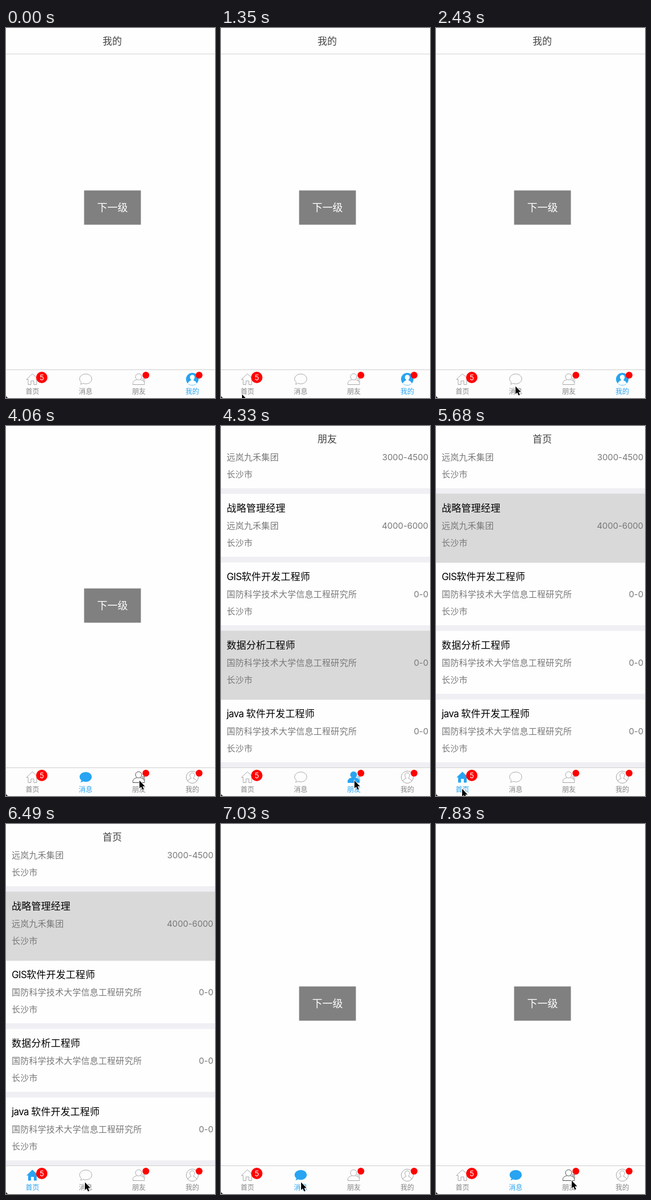
Animation of 368x648 px, one loop 8000 ms. Source, as an HTML page:

```html
<!DOCTYPE html>
<html lang="zh-CN">
<head>
<meta charset="utf-8">
<title>Tab bar</title>
<style>
html, body { margin: 0; width: 100%; height: 100%; overflow: hidden; background: #fefefe; }
svg { display: block; width: 368px; height: 648px; font-family: Inter, "Noto Sans CJK SC", "Noto Sans CJK", sans-serif; }
.nav { font-size: 17px; font-weight: 500; fill: #444; text-anchor: middle; }
.job { font-size: 17px; letter-spacing: .25px; }
.job .latin { letter-spacing: -.6px; }
.info { font-size: 15px; letter-spacing: .28px; fill: #787878; }
.pay { font-size: 15px; letter-spacing: -.1px; fill: #787878; text-anchor: end; }
.label { font-size: 12px; text-anchor: middle; }
.outline { fill: #fdfdfd; stroke-width: 1; stroke-linejoin: round; }
</style>
</head>
<body>
<svg id="stage" viewBox="0 0 368 648"></svg>
<script>
const LOOP = 8000;
const BLUE = '#28a4f2';
const TABS = ['首页', '消息', '朋友', '我的'];
const HOME = 0, MESSAGES = 1, FRIENDS = 2, MINE = 3;

// [start ms, value], each held until the next entry
const PAGES = [[0, MINE], [2990, MESSAGES], [4330, FRIENDS], [5680, HOME], [7030, MESSAGES]];
const PRESSES = [[0, -1], [4060, FRIENDS], [4330, -1], [5410, HOME], [5680, -1], [7830, FRIENDS]];
const CURSOR = [
  [0, null], [1350, [36, 640]], [1620, [40, 635]], [1890, [86, 632]], [2160, [137, 628]],
  [2430, [139, 626]], [3530, [210, 623]], [3800, [234, 619.5]], [4870, [62, 637]],
  [5140, [44, 634]], [5680, [45, 634]], [5950, [121, 629]], [6220, [129, 626]],
  [6490, [138, 626]], [7030, [140, 626]], [7300, [242, 626]], [7570, [238, 623]]
];

const INSTITUTE = '国防科学技术大学信息工程研究所';
const COMPANY = '远岚九禾集团';
const JOBS = [
  ['', '', COMPANY, '3000-4500'],
  ['', '战略管理经理', COMPANY, '4000-6000'],
  ['GIS', '软件开发工程师', INSTITUTE, '0-0'],
  ['', '数据分析工程师', INSTITUTE, '0-0'],
  ['java ', '软件开发工程师', INSTITUTE, '0-0']
];

const valueAt = (track, t) => track.reduce((v, [start, next]) => t >= start ? next : v, null);
const rect = (x, y, w, h, fill) => `<rect x="${x}" y="${y}" width="${w}" height="${h}" fill="${fill}"/>`;
const circle = (x, y, r, attrs) => `<circle cx="${x}" cy="${y}" r="${r}" ${attrs}/>`;
const path = (d, attrs = '') => `<path d="${d}" ${attrs}/>`;
const text = (x, y, cls, s, attrs = '') => `<text x="${x}" y="${y}" class="${cls}" ${attrs}>${s}</text>`;

// Icons are drawn around the point (tab centre, 615)
const HOUSE = 'M-10 .5L.5-9.5L11 .5H8V9.5H3V3H-2V9.5H-7V.5Z';
const BUBBLE = 'M.5-9C6.6-9 11-5.2 11-.4S6.6 8.2 .5 8.2C-1.2 8.2-2.9 7.9-4.3 7.3C-5.8 8.4-7.3 8.8-9 8.8C-8 7.8-7.4 6.6-7.2 5.5C-9.2 4-10.4 1.9-10.4-.4C-10.4-5.2-5.6-9 .5-9Z';
const FRIEND_HEAD = 'M-.5-9.5C2.8-9.5 5-7.2 5-4.2S2.5 1.4-.5 1.4S-6-1.2-6-4.2S-3.8-9.5-.5-9.5Z';
const FRIEND_BODY = 'M-3.6 1C-8.2 2-10.6 4-10.6 7.5V9.5H9.8V7.5C9.8 4.2 7.2 2 2.6 1';
const FRIEND_LINES = 'M5.5-.5H11M6.5 2H11M8.5 4.5H11';
const PERSON_BODY = 'M-8 7.4C-6.8 4.2-4.6 3-2.4 2.4V.8C-4-.6-4.3-2.5-4.1-4.2C-3.7-6.4-2.1-7.6 0-7.6S3.7-6.4 4.1-4.2C4.3-2.5 4-.6 2.4 .8V2.4C4.6 3 6.8 4.2 8 7.4';

function icon(tab, active, pressed) {
  const color = active ? BLUE : pressed ? '#4c4c4c' : '#a6a6a6';
  const style = active ? `fill="${BLUE}"` : `class="outline" stroke="${color}"`;
  if (tab === HOME) return path(HOUSE, style);
  if (tab === MESSAGES) return path(BUBBLE, style);
  if (tab === FRIENDS) {
    const edge = active ? `stroke="${BLUE}"` : '';
    return path(FRIEND_BODY, style + edge) + path(FRIEND_HEAD, style + edge) +
      path(FRIEND_LINES, `stroke="${color}" fill="none"`);
  }
  return active
    ? circle(0, 0, 11, style) +
      path(PERSON_BODY + 'C5.8 9.3 3 10.2 0 10.2S-5.8 9.3-8 7.4Z', 'fill="#fefefe"')
    : circle(0, 0, 10.6, style) + path(PERSON_BODY, `fill="none" stroke="${color}"`);
}

function tabBar(page, pressed) {
  const items = TABS.map((name, i) => {
    const x = 46.5 + i * 93.8;
    const active = i === page;
    return `<g transform="translate(${Math.round(x - .3)} 615)">${icon(i, active, i === pressed)}</g>` +
      text(x, 641.3, 'label', name, `fill="${active ? BLUE : '#858585'}"`);
  }).join('');
  return rect(0, 598, 368, 50, '#fdfdfd') + rect(0, 598, 368, 1, '#d0d0d0') + items +
    circle(63, 612, 10, 'fill="#f00"') +
    text(63, 616.6, 'label', '5', 'fill="#fff" style="font-size:13px"') +
    circle(246.3, 608, 6, 'fill="#f00"') + circle(340, 608, 6, 'fill="#f00"');
}

function jobList(selected) {
  const top = i => i * 120 - 1;
  const cards = JOBS.map((_, i) => rect(0, top(i), 368, 110, '#fefefe')).join('');
  const highlight = rect(0, top(selected) - .5, 368, 121, '#d9d9d9');
  const rows = JOBS.map(([latin, name, firm, pay], i) => {
    const y = top(i);
    const title = `<tspan class="latin">${latin}</tspan>${name}`;
    return text(10, y + 31.3, 'job', title) + text(10, y + 60.7, 'info', firm) +
      text(365, y + 60.7, 'pay', pay) + text(10, y + 90.7, 'info', '长沙市');
  }).join('');
  return rect(0, 0, 368, 598, '#efeff4') + cards + highlight + rows + rect(0, 0, 368, 44, '#fefefe');
}

function nextButton() {
  return rect(137.5, 284.5, 100, 60, '#808080') +
    text(187.5, 320.8, '', '下一级', 'fill="#fff" font-size="18" text-anchor="middle"');
}

function content(page) {
  const body = page === HOME ? jobList(1) : page === FRIENDS ? jobList(3) : nextButton();
  const title = page === MESSAGES ? '' : text(187, 29, 'nav', TABS[page]);
  const line = page === MINE ? rect(0, 45, 368, 1, '#d4d4d4') : '';
  return body + title + line;
}

function pointer(at) {
  return at ? path('M1 1.5V15L4 12.2L6.4 17.4L8.7 16.4L6.4 11.4H10.6Z',
    `transform="translate(${at})" fill="#000" stroke="#fff" stroke-width="1.6" paint-order="stroke"`) : '';
}

const stage = document.getElementById('stage');
const corner = path('M0 643.5C.3 646 2 647.7 4.5 648H0Z', 'fill="#111"');
let shown = '';

function draw(t) {
  const page = valueAt(PAGES, t);
  const pressed = valueAt(PRESSES, t);
  const at = valueAt(CURSOR, t);
  const state = [page, pressed, at].join();
  if (state === shown) return;
  shown = state;
  stage.innerHTML = rect(0, 0, 368, 648, '#fefefe') + content(page) +
    tabBar(page, pressed) + corner + pointer(at);
}

const start = performance.now();
function tick() {
  draw((performance.now() - start) % LOOP);
  requestAnimationFrame(tick);
}
tick();
</script>
</body>
</html>
```
